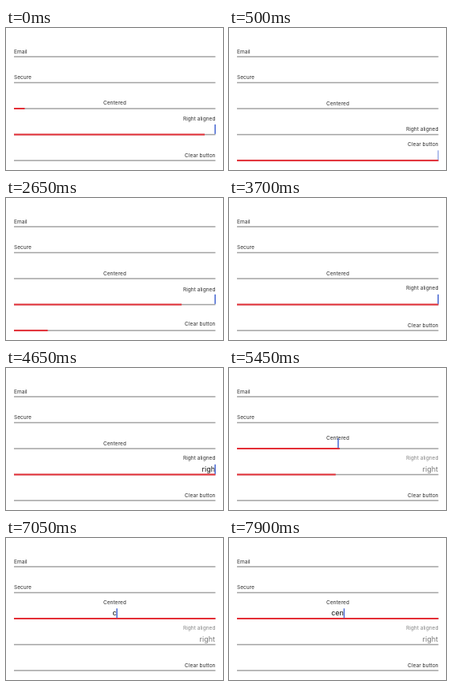
An HTML page with a canvas that plays this animation: 272x178 px, repeating every 8000 ms.

```html
<!DOCTYPE html>
<html lang="en">
<head>
<meta charset="utf-8">
<title>Text fields</title>
<style>
html, body { margin: 0; width: 100%; height: 100%; overflow: hidden; background: #fff; }
canvas { display: block; width: 272px; height: 178px; }
</style>
</head>
<body>
<canvas id="stage"></canvas>
<script>
const W = 272, H = 178, LOOP = 8000;
const LEFT = 10, RIGHT = 262.5, MID = 136.3, PITCH = 32.55;
const MOVE = 150, BLINK = 250, FADE = 110;
const FONT = 'Inter, "Open Sans", sans-serif';
const INK = '#303030', DIM = '#858585', RULE = '#a3a3a3', RED = '#e42f37', BLUE = '#4767d2';

const CENTER = 2, ALIGNED = 3, CLEAR = 4;
const fields = [
  { label: 'Email', align: 'left' },
  { label: 'Secure', align: 'left' },
  { label: 'Centered', align: 'center', word: 'cen', keys: [7000, 7150, 7300] },
  { label: 'Right aligned', align: 'right', word: 'right', keys: [4200, 4320, 4440, 4560, 4690] },
  { label: 'Clear button', align: 'right', word: 'clear', keys: [600, 700, 800, 950, 1090], clearAt: 1650 }
];

// [time, focused field]
const focus = [[-700, CENTER], [-128, ALIGNED], [200, CLEAR], [2540, ALIGNED],
  [5375, CENTER], [5945, ALIGNED], [6555, CENTER]];

// The caret restarts its blink on focus, on a key press and shortly after some of them.
const wakes = [1150, 1650, 1800, 5450]
  .concat(focus.map(f => f[0]), ...fields.map(f => f.keys || []))
  .sort((a, b) => a - b);

const canvas = document.getElementById('stage');
const ctx = canvas.getContext('2d');
const dpr = window.devicePixelRatio || 1;
canvas.width = W * dpr;
canvas.height = H * dpr;

const clamp = v => Math.min(1, Math.max(0, v));
const ease = v => { v = clamp(v); return v * v * (3 - 2 * v); };
const anchor = align => align === 'left' ? LEFT : align === 'center' ? MID : RIGHT;

function write(text, x, y, size, align, color) {
  ctx.font = `${size}px ${FONT}`;
  ctx.textAlign = align;
  ctx.fillStyle = color;
  ctx.fillText(text, x, y);
}

function bar(x, y, w, h, color) {
  ctx.fillStyle = color;
  ctx.fillRect(x, y, w, h);
}

function caretAlpha(t) {
  const start = wakes.filter(w => w <= t).pop();
  const age = t - start, phase = age % (2 * BLINK);
  if (phase >= BLINK) return 1 - clamp((phase - BLINK) / FADE);
  return age < 2 * BLINK ? 1 : clamp(phase / FADE);
}

function drawClearButton(x, y) {
  ctx.fillStyle = '#bcbcc0';
  ctx.beginPath();
  ctx.arc(x, y, 3.8, 0, 2 * Math.PI);
  ctx.fill();
  ctx.strokeStyle = '#fff';
  ctx.lineWidth = 0.8;
  ctx.beginPath();
  for (const s of [-1, 1]) {
    ctx.moveTo(x - 1.5, y - 1.5 * s);
    ctx.lineTo(x + 1.5, y + 1.5 * s);
  }
  ctx.stroke();
}

function drawField(f, i, active, amount, t) {
  const top = i * PITCH;
  const typed = f.word ? f.word.slice(0, f.keys.filter(k => k <= t).length) : '';
  const cleared = f.clearAt && t >= f.clearAt;
  const filled = typed && !cleared;
  const lift = filled ? 1 : amount;
  const x = anchor(f.align);
  const textX = f.clearAt ? 245 : f.align === 'right' ? x - 0.5 : x - 0.3;
  const color = filled && !active ? DIM : INK;

  bar(LEFT, 35.2 + top, RIGHT - LEFT, 1.5, RULE);
  if (amount > 0) bar(LEFT, 34.9 + top, (RIGHT - LEFT) * amount, 2, RED);
  write(f.label, x, 31.8 + top - 14.4 * lift, 6.6, f.align, color);

  const shown = cleared ? 1 - clamp((t - f.clearAt) / 220) : 1;
  if (typed && shown > 0) {
    ctx.globalAlpha = shown;
    write(typed, textX, 32.3 + top, 9, f.align, active ? '#161616' : '#777');
    if (f.clearAt) drawClearButton(257.5, 29.4 + top);
    ctx.globalAlpha = 1;
  }

  if (active) {
    let caret = f.align === 'right' ? 261.4 : MID - 0.2;
    if (filled && f.clearAt) caret = 244.3;
    if (filled && f.align === 'center') {
      ctx.font = `9px ${FONT}`;
      caret = textX + ctx.measureText(typed).width / 2 - 0.3;
    }
    ctx.globalAlpha = caretAlpha(t);
    bar(caret, 23.2 + top, 1.5, 12, BLUE);
    ctx.globalAlpha = 1;
  }
}

function draw(t) {
  ctx.setTransform(dpr, 0, 0, dpr, 0, 0);
  bar(0, 0, W, H, '#fff');
  const past = focus.filter(f => f[0] <= t);
  const [since, now] = past[past.length - 1];
  const before = past.length > 1 ? past[past.length - 2][1] : -1;
  const p = ease((t - since) / MOVE);
  fields.forEach((f, i) => {
    const amount = i === now ? p : i === before ? 1 - p : 0;
    drawField(f, i, i === now, amount, t);
  });
}

const begin = performance.now();
function tick() {
  draw((performance.now() - begin) % LOOP);
  requestAnimationFrame(tick);
}
tick();
</script>
</body>
</html>
```
